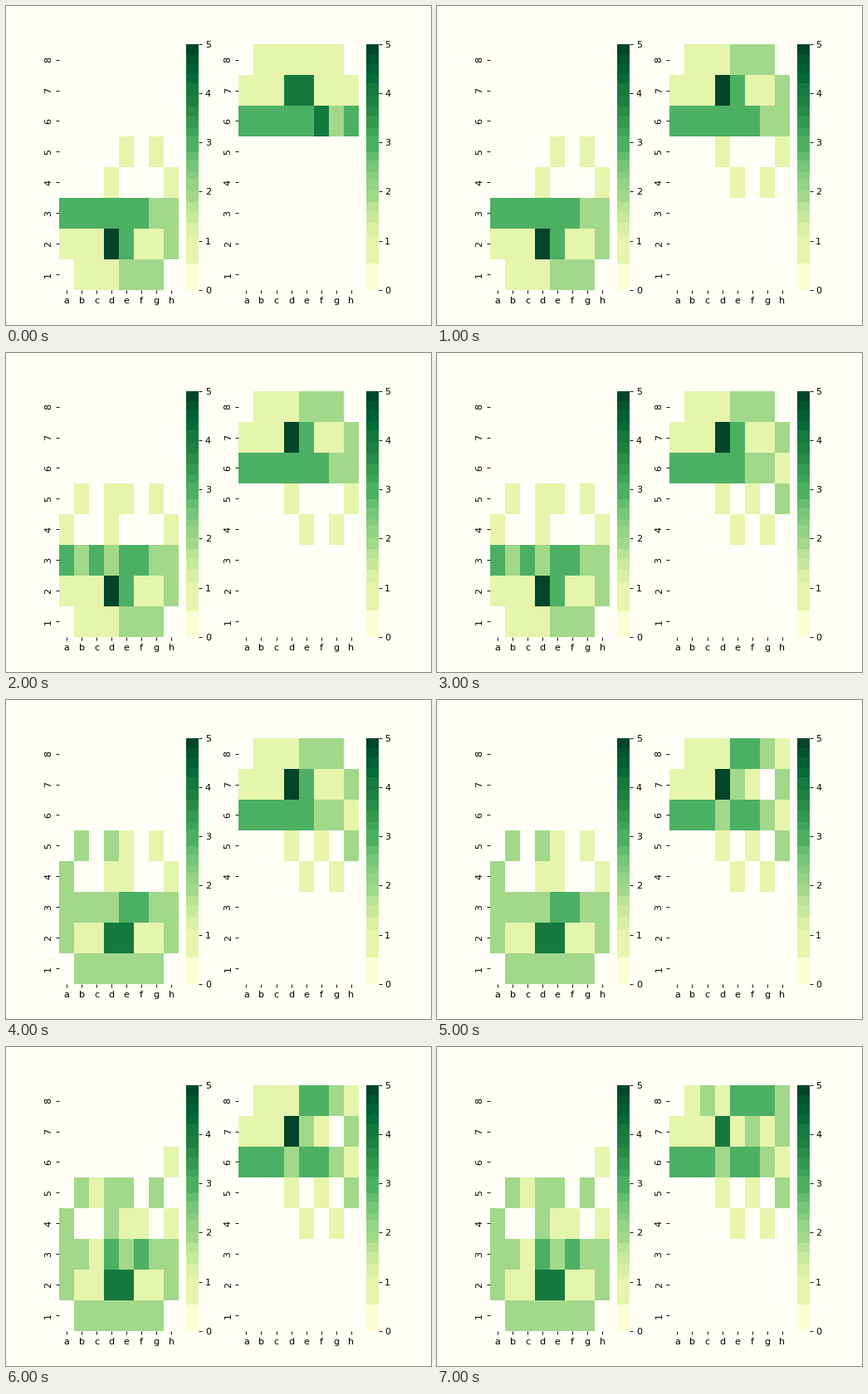
Animation of 512x384 px, one loop 8 s. Source, as a matplotlib script:

```python
import matplotlib.pyplot as plt
import numpy as np
from matplotlib.animation import FuncAnimation
from matplotlib.colors import BoundaryNorm, ListedColormap

PAPER = "#fffff6"
FILES = "abcdefgh"
OPENING = {
    1: ["g1f3", "c2c4", "b1c3", "d2d4"],
    -1: ["g8f6", "g7g6", "f8g7", "e8g8 h8f8"],
}

STRAIGHT = [(1, 0), (-1, 0), (0, 1), (0, -1)]
DIAGONAL = [(1, 1), (1, -1), (-1, 1), (-1, -1)]
KNIGHT = [(x, y) for x in (-2, -1, 1, 2) for y in (-2, -1, 1, 2)
          if abs(x) != abs(y)]
SLIDES = {"R": STRAIGHT, "B": DIAGONAL, "Q": STRAIGHT + DIAGONAL}


def square(name):
    return FILES.index(name[0]), int(name[1]) - 1


def position(side, count):
    """Pieces of one side after its first moves of the opening."""
    home, pawns = (0, 1) if side == 1 else (7, 6)
    board = {(x, home): piece for x, piece in enumerate("RNBQKBNR")}
    board.update({(x, pawns): "P" for x in range(8)})
    for turn in OPENING[side][:count]:
        for move in turn.split():
            board[square(move[2:])] = board.pop(square(move[:2]))
    return board


def inside(x, y):
    return 0 <= x < 8 and 0 <= y < 8


def ray(board, side, x, y, step):
    """Squares along a line, looking through pieces that support it."""
    last = False
    while True:
        x, y = x + step[0], y + step[1]
        if not inside(x, y):
            return
        yield x, y
        piece = board.get((x, y))
        if last:
            return
        if piece == "P" and step[0] and step[1] == side:
            last = True
        elif piece and step not in SLIDES.get(piece, []):
            return


def control(side, count):
    """How often each square is attacked by one side; zeros are masked."""
    board = position(side, count)
    leaps = {"N": KNIGHT, "K": STRAIGHT + DIAGONAL,
             "P": [(-1, side), (1, side)]}
    grid = np.zeros((8, 8))
    for (x, y), piece in board.items():
        for dx, dy in leaps.get(piece, []):
            if inside(x + dx, y + dy):
                grid[y + dy, x + dx] += 1
        for step in SLIDES.get(piece, []):
            for cx, cy in ray(board, side, x, y, step):
                grid[cy, cx] += 1
    return np.ma.masked_equal(grid, 0)


# Stepped green scale; bands holding a whole number take its exact colour
edges = [0, 0.54, 1.12, 1.37, 1.6, 1.79, 2.03, 2.27, 2.4, 2.63, 2.8,
         3.14, 3.3, 3.53, 3.73, 3.95, 4.2, 4.4, 4.62, 4.8, 5]
greens = plt.get_cmap("YlGn")


def band_colour(low, high):
    whole = [k for k in range(1, 6) if low <= k <= high]
    return greens((whole[0] if whole else (low + high) / 2) / 5)


cmap = ListedColormap([band_colour(*pair) for pair in zip(edges, edges[1:])])
cmap.set_bad(PAPER)
norm = BoundaryNorm(edges, cmap.N, clip=True)

fig, axes = plt.subplots(1, 2, figsize=(6.4, 4.8), dpi=80, facecolor=PAPER)


def heatmap(ax, grid):
    mesh = ax.pcolormesh(grid, cmap=cmap, norm=norm)
    ax.set(xlim=(0, 8), ylim=(0, 8), facecolor=PAPER)
    ax.spines[:].set_visible(False)
    ax.set_xticks(np.arange(8) + 0.5, list(FILES))
    ax.set_yticks(np.arange(8) + 0.5, range(1, 9),
                  rotation="vertical", va="center")
    bar = fig.colorbar(mesh, ax=ax, ticks=range(6), spacing="proportional")
    bar.outline.set_linewidth(0)
    bar.minorticks_off()
    return mesh


white = heatmap(axes[0], control(1, 1))
black = heatmap(axes[1], control(-1, 0))


def update(i):
    white.set_array(control(1, 1 + i // 2))
    black.set_array(control(-1, (i + 1) // 2))
    return white, black


anim = FuncAnimation(fig, update, frames=8, interval=1000, repeat=True)
plt.show()
```
